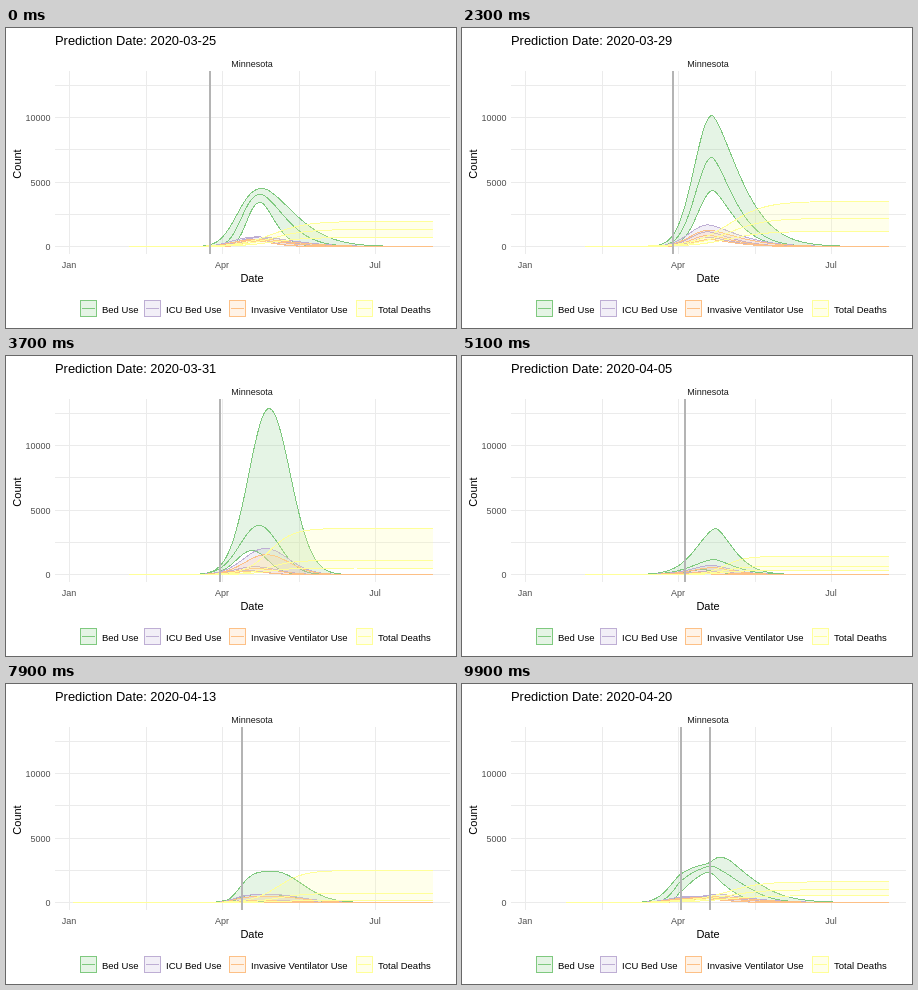
Recreate the animation shown at these times as an HTML page. Size 450 by 300 pixels, loop 10 s.

```html
<!DOCTYPE html>
<html lang="en">
<head>
<meta charset="utf-8">
<title>Prediction chart</title>
<style>
  html, body { margin: 0; width: 100%; height: 100%; overflow: hidden; background: #fff; }
  svg { display: block; font-family: "Liberation Sans", Arial, sans-serif; font-size: 9px; }
  path, rect { shape-rendering: crispEdges; }
  .grid { stroke: #ebebeb; fill: none; }
  .tick { fill: #4d4d4d; }
  .axis { font-size: 11px; }
  .legend { font-size: 9.5px; }
</style>
</head>
<body>
<svg id="chart" width="450" height="300" viewBox="0 0 450 300"></svg>
<script>
const BASE = 218.5, DAY = 1.681, JAN1 = 62.9, POINTS = 215;
const svg = document.getElementById('chart');

function add(tag, attrs, text = '') {
  const el = document.createElementNS('http://www.w3.org/2000/svg', tag);
  for (const key in attrs) el.setAttribute(key, attrs[key]);
  el.textContent = text;
  return svg.appendChild(el);
}

const range = n => Array.from({ length: n }, (_, i) => i);
const mix = (a, b, t) => Array.isArray(a) ? a.map((v, i) => mix(v, b[i], t)) : a + (b - a) * t;

// Long series start in early January; short ones in February, with their
// points matched to the long ones through this piecewise mapping.
const WARP = [[67, 123], [179, 236], [222, 249], [247, 268], [276, 282], [290, 290], [427, 427]];
function shortX(x) {
  const i = Math.max(1, WARP.findIndex(p => p[0] >= x - 1e-6));
  const [x0, y0] = WARP[i - 1], [x1, y1] = WARP[i];
  return y0 + (y1 - y0) * (x - x0) / (x1 - x0);
}

function hump(x, [center, height, left, right], [leftPower, rightPower]) {
  const d = x - center;
  return height * Math.exp(-(d < 0 ? (-d / left) ** leftPower : (d / right) ** rightPower));
}

// Returns [measure][upper, mean, lower][point] = [x, height]
function forecast({ long = false, bed, power, icu, deaths, rise }) {
  const xs = range(POINTS).map(i => 67 + 360 * i / (POINTS - 1)).map(x => long ? x : shortX(x));
  const sample = f => xs.map(x => [x, f(x)]);
  const scaled = (k, shift) => bed.map(([c, h, l, r]) =>
    sample(x => hump(x, [c - shift, h * k, l * 1.05, r * 1.1], power)));
  return [
    bed.map(b => sample(x => hump(x, b, power))),
    scaled(icu, 4),
    scaled(icu * 0.76, 3),
    deaths.map(d => sample(x => d / (1 + Math.exp((rise[0] - x) / rise[1]))))
  ];
}

const early = forecast({
  bed: [[257, 58, 32, 45], [255, 52, 24, 34], [255, 44, 18, 20]], power: [2.5, 1.6],
  icu: 0.165, deaths: [25, 17, 9], rise: [267, 17] });
const tall = forecast({
  bed: [[250, 131, 25, 39], [250, 89, 23, 31], [251, 56, 21, 29]], power: [2, 1.45],
  icu: 0.165, deaths: [45, 28, 15], rise: [267, 18] });
const highest = forecast({
  bed: [[263, 166, 28.5, 30], [253, 49, 27, 28], [246, 24, 22, 22]], power: [2, 2],
  icu: 0.157, deaths: [46, 14, 6.5], rise: [263, 12] });
const low = forecast({
  bed: [[254, 46, 28, 25], [252, 15, 30, 28], [240, 5, 20, 20]], power: [1.7, 1.5],
  icu: 0.2, deaths: [18, 8, 4], rise: [263, 10] });
const lower = forecast({ long: true,
  bed: [[260, 35, 34, 30], [252, 11, 30, 32], [238, 3, 24, 24]], power: [2, 1.9],
  icu: 0.22, deaths: [18, 6, 2], rise: [262, 10] });
const broad = forecast({ long: true,
  bed: [[268, 31, 37, 39], [263, 8, 35, 40], [235, 2.5, 22, 24]], power: [4, 2],
  icu: 0.26, deaths: [32, 9, 2], rise: [272, 13] });
const last = forecast({ long: true,
  bed: [[255, 31, 20, 31], [252, 9, 25, 30], [245, 3, 25, 25]], power: [4, 1.4],
  icu: 0.22, deaths: [12, 4, 2], rise: [262, 12] });

const states = [
  ['03-25', early], ['03-26', early], ['03-27', early], ['03-29', tall],
  ['03-30', mix(tall, highest, 0.5)], ['03-31', highest], ['04-01', mix(highest, low, 0.3)],
  ['04-05', low], ['04-07', low], ['04-08', lower], ['04-10', mix(lower, broad, 0.5)],
  ['04-13', broad], ['04-17', mix(broad, last, 0.5)], ['04-20', last]
].map(([date, data]) => {
  const [month, day] = date.split('-').map(Number);
  return { date, data, x: JAN1 + DAY * ((month === 3 ? 59 : 90) + day) };
});

// Static layout
add('path', { class: 'grid', d: [63.5, 140.5, 216.5, 293.5, 369.5].map(x => `M${x} 43V226`).join('') +
  [57.5, 89.5, 121.5, 154.5, 186.5, 218.5].map(y => `M49 ${y}H444`).join('') });
const title = add('text', { x: 49, y: 17, 'font-size': 12.9 });
add('text', { x: 246, y: 39, 'text-anchor': 'middle', fill: '#1a1a1a' }, 'Minnesota');
[['0', 222], ['5000', 158], ['10000', 93]].forEach(([label, y]) =>
  add('text', { class: 'tick', x: 44.5, y, 'text-anchor': 'end' }, label));
[['Jan', 63], ['Apr', 216], ['Jul', 369]].forEach(([label, x]) =>
  add('text', { class: 'tick', x, y: 240, 'text-anchor': 'middle' }, label));
add('text', { class: 'axis', x: 246, y: 254, 'text-anchor': 'middle' }, 'Date');
add('text', { class: 'axis', 'text-anchor': 'middle', transform: 'translate(15 136) rotate(-90)' }, 'Count');

const measures = [
  ['Bed Use', '#7fc97f', 74], ['ICU Bed Use', '#beaed4', 138],
  ['Invasive Ventilator Use', '#fdc086', 223], ['Total Deaths', '#ffff99', 350]
];
measures.forEach(([name, color, x]) => {
  add('rect', { x: x + 0.5, y: 272.5, width: 16, height: 16, fill: color, 'fill-opacity': 0.2, stroke: color });
  add('path', { d: `M${x + 2} 280.5H${x + 15}`, stroke: color });
  add('text', { class: 'legend', x: x + 22, y: 285 }, name);
});
const layers = measures.map(([, color]) => ({
  ribbon: add('path', { fill: color, 'fill-opacity': 0.2 }),
  lines: add('path', { fill: 'none', stroke: color })
}));
const [marker, oldMarker] = range(2).map(() => add('rect', { y: 43, width: 2, height: 183, fill: '#b4b4b4' }));

const moveMarker = (el, x) => el.setAttribute('x', Math.round(x) - 1);
const polyline = points => points.map(([x, h]) => `${x.toFixed(2)} ${(BASE - h).toFixed(2)}`).join('L');

const STEP = 100, LOOP = 10000;
const starts = [400, 1300, 2000, ...range(11).map(i => 2800 + 700 * i)];

function draw(time) {
  let index = 0, progress = 0;
  starts.forEach((start, i) => {
    if (time < start) return;
    const steps = start === 2000 ? 4 : 3;
    progress = Math.min(1, ((time - start) / STEP + 1) / steps);
    index = i;
  });
  if (progress === 1) { index++; progress = 0; }

  const from = states[index], to = states[(index + 1) % states.length];
  title.textContent = 'Prediction Date: 2020-' + from.date;
  const data = progress ? mix(from.data, to.data, progress) : from.data;
  data.forEach((curves, i) => {
    const [upper, , bottom] = curves;
    layers[i].ribbon.setAttribute('d', `M${polyline(upper)}L${polyline(bottom.slice().reverse())}Z`);
    layers[i].lines.setAttribute('d', curves.map(c => 'M' + polyline(c)).join(''));
  });

  moveMarker(marker, mix(from.x, to.x, progress));
  // The final marker lingers while the loop returns to the first date.
  const returning = progress && index === states.length - 1;
  moveMarker(oldMarker, from.x);
  oldMarker.setAttribute('visibility', returning ? 'visible' : 'hidden');
}

let shown = -1;
function tick() {
  const time = Math.floor(performance.now() % LOOP / STEP) * STEP;
  if (time !== shown) draw(shown = time);
  requestAnimationFrame(tick);
}
tick();
</script>
</body>
</html>
```
